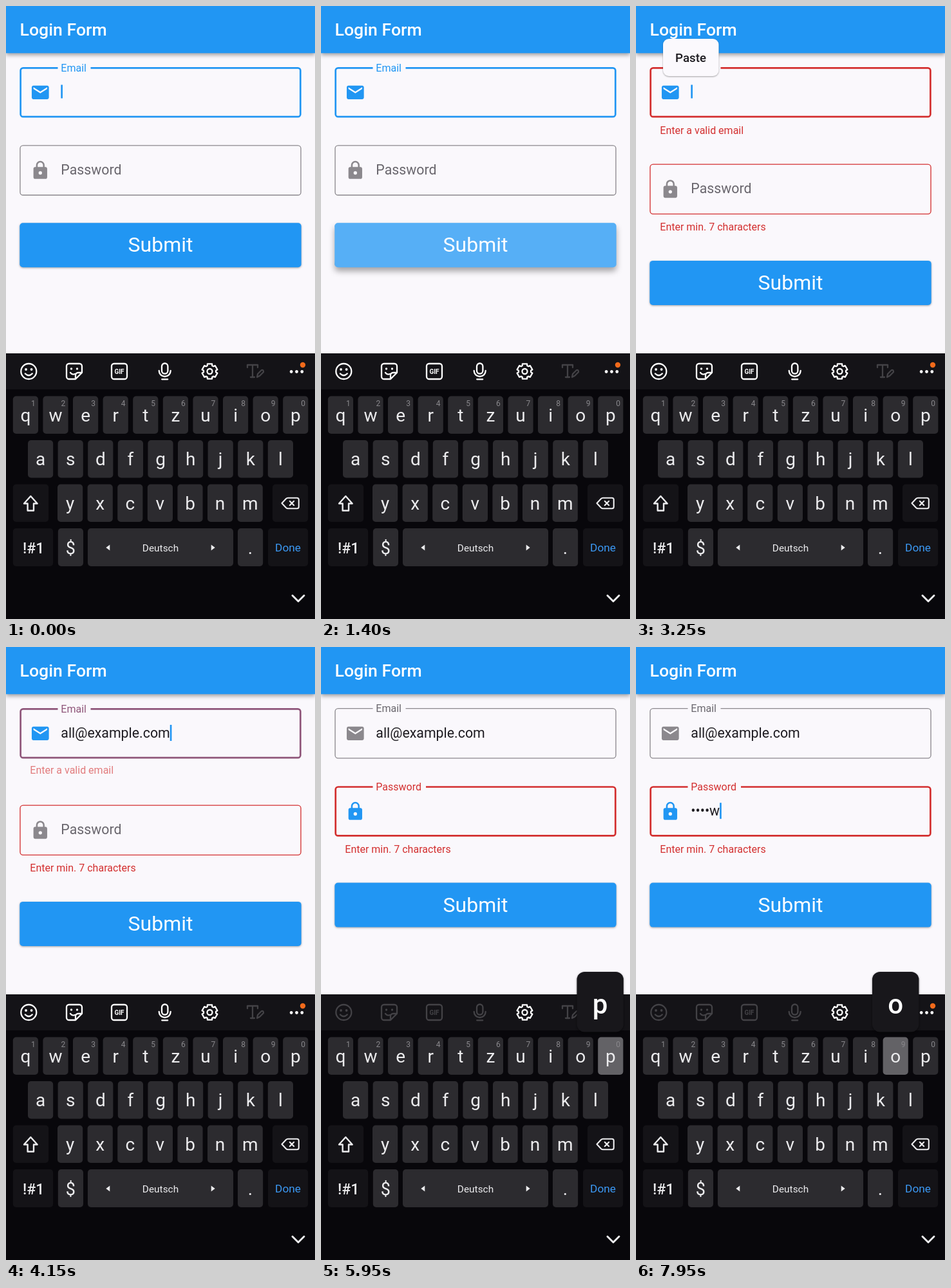
Animation, 480 px wide and 953 px high, one loop 8000 ms. Source, as an HTML page:

```html
<!DOCTYPE html>
<html lang="en">
<head>
<meta charset="utf-8">
<title>Login Form</title>
<style>
  html, body { margin: 0; width: 100%; height: 100%; overflow: hidden; background: #faf8fc; }
  svg { display: block; width: 100%; height: 100%; }
  text { font-family: Roboto, sans-serif; white-space: pre; }
  .mid { text-anchor: middle; }
  .line { fill: none; stroke-linecap: round; stroke-linejoin: round; }
</style>
</head>
<body>
<svg id="stage" viewBox="0 0 480 953"></svg>
<script>
const LOOP = 8000;
const BLUE = [33, 150, 243], RED = [211, 47, 47], GREY = [139, 136, 141], LABEL = [106, 103, 110];
const PRESS = 600, RELEASE = 1450, MENU = 3250, PASTE = 4100, FOCUS = 5110;
const FADE = 167, ERROR_HEIGHT = 29.3, FIELD_HEIGHT = 78.5, TEXT_X = 85.3;
const ADDRESS = 'all@example.com';

// key, popup shown, character entered, popup hidden
const STROKES = [
  ['p', 5950, 6100, 6200], ['a', 6650, 6750, 6850], ['s', 6950, 7000, 7100],
  ['s', 7150, 7200, 7250], ['w', 7400, 7500, 7550], ['o', 7950, 8050, 8100],
];
const CARET_HIDDEN = [[250, 750], [1250, 1750], [2250, 2750], [3750, 4100], [4600, 5100], [5600, 6100], [6650, 6750]];

const stage = document.getElementById('stage');

function add(tag, attrs = {}, parent = stage, content) {
  const node = document.createElementNS('http://www.w3.org/2000/svg', tag);
  set(node, attrs);
  if (content !== undefined) node.textContent = content;
  parent.append(node);
  return node;
}
function set(node, attrs) {
  for (const name in attrs) node.setAttribute(name, attrs[name]);
}
const box = (x, y, width, height, rx, fill, parent) => add('rect', { x, y, width, height, rx, fill }, parent);
const label = (content, x, y, size, fill, attrs = {}, parent) =>
  add('text', { x, y, 'font-size': size, fill, ...attrs }, parent, content);
const centred = (content, x, y, size, fill, attrs = {}, parent) =>
  label(content, x, y, size, fill, { class: 'mid', ...attrs }, parent);

const clamp = v => Math.max(0, Math.min(1, v));
const lerp = (a, b, p) => a + (b - a) * p;
const mix = (a, b, p) => a.map((v, i) => lerp(v, b[i], p));
const rgb = c => `rgb(${c.map(Math.round)})`;
const within = (t, from, to) => t >= from && t < to;

function bezier(x1, y1, x2, y2) {
  const at = (a, b, s) => 3 * a * s * (1 - s) ** 2 + 3 * b * s * s * (1 - s) + s ** 3;
  return x => {
    let lo = 0, hi = 1;
    for (let i = 0; i < 20; i++) {
      const s = (lo + hi) / 2;
      if (at(x1, x2, s) < x) lo = s; else hi = s;
    }
    return at(y1, y2, lo);
  };
}
const ease = bezier(0.25, 0.1, 0.25, 1);
const standard = bezier(0.4, 0, 0.2, 1);
const ramp = (t, start, duration = FADE) => standard(clamp((t - start) / duration));

// Form
const ICONS = {
  mail: 'M20 4H4c-1.1 0-2 .9-2 2v12c0 1.1.9 2 2 2h16c1.1 0 2-.9 2-2V6c0-1.1-.9-2-2-2zm0 4l-8 5-8-5V6l8 5 8-5v2z',
  lock: 'M18 8h-1V6a5 5 0 0 0-10 0v2H6c-1.1 0-2 .9-2 2v10c0 1.1.9 2 2 2h12c1.1 0 2-.9 2-2V10c0-1.1-.9-2-2-2z' +
    'm-6 9a2 2 0 1 1 0-4 2 2 0 0 1 0 4zm3.1-9H8.9V6a3.1 3.1 0 0 1 6.2 0v2z',
};

function makeField(name, icon, error, gap) {
  const group = add('g');
  return {
    group, gap,
    outline: add('path', { class: 'line', style: 'stroke-linecap:butt' }, group),
    icon: add('path', { d: ICONS[icon], transform: 'translate(37.3 23.3) scale(1.3333)', 'fill-rule': 'evenodd' }, group),
    caret: box(TEXT_X, 27.5, 2.67, 21, 0, rgb(BLUE), group),
    text: label('', TEXT_X, 45.5, 21.33, '#1d1b20', {}, group),
    name: label(name, TEXT_X, 0, 16, '', {}, group),
    error: label(error, 37.3, 0, 16, rgb(RED), {}, group),
  };
}

function outlinePath(width, gap) {
  const inset = width / 2, r = 5.3 - inset;
  const left = 21.3 + inset, right = 458.7 - inset, top = inset, bottom = FIELD_HEIGHT - inset;
  const arc = (x, y) => `A${r} ${r} 0 0 1 ${x} ${y}`;
  return `M${80.5 + gap} ${top}H${right - r}${arc(right, top + r)}V${bottom - r}${arc(right - r, bottom)}` +
    `H${left + r}${arc(left, bottom - r)}V${top + r}${arc(left + r, top)}H80.5`;
}

function drawField(field, s) {
  set(field.group, { transform: `translate(0 ${s.top})` });
  set(field.outline, { d: outlinePath(s.width, field.gap * s.float), stroke: rgb(s.border), 'stroke-width': s.width });
  set(field.icon, { fill: rgb(s.focused ? BLUE : GREY) });
  set(field.name, {
    y: lerp(45.5, s.width / 2 + 5.4, s.float),
    'font-size': lerp(21.33, 16, s.float),
    fill: rgb(s.label),
  });
  set(field.error, { y: 103.5 - 5 * (1 - s.error), opacity: s.error });
  if (field.text.textContent !== s.text) field.text.textContent = s.text;
  set(field.caret, {
    x: TEXT_X + (s.text ? field.text.getComputedTextLength() : 0),
    y: s.text ? 26 : 27.5,
    height: s.text ? 25 : 21,
    opacity: s.focused && s.caret ? 1 : 0,
  });
}

box(0, 0, 480, 953, 0, '#faf8fc');
const email = makeField('Email', 'mail', 'Enter a valid email', 51);
const password = makeField('Password', 'lock', 'Enter min. 7 characters', 82.5);

const submit = add('g');
const submitShape = box(21.3, 0, 437.4, 69, 5, rgb(BLUE), submit);
const clip = add('clipPath', { id: 'button' }, submit);
box(21.3, 0, 437.4, 69, 5, '#000', clip);
const ripple = add('circle', { fill: '#fff', cy: 34.5 }, add('g', { 'clip-path': 'url(#button)' }, submit));
centred('Submit', 240, 45, 32, '#fff', {}, submit);

box(0, -20, 480, 93.3, 0, rgb(BLUE)).style.filter = 'drop-shadow(0 3px 3px rgba(0,0,0,.36))';
label('Login Form', 21.5, 46, 26.67, '#fff', { 'font-weight': 500 });

const menu = add('g');
box(42, 51, 86.5, 58, 9, '#fbf9fd', menu).style.filter = 'drop-shadow(0 1px 1.3px rgba(0,0,0,.35))';
centred('Paste', 85, 86.5, 18.67, '#1d1b20', { 'font-weight': 500 }, menu);

// Keyboard
const KEY = '#2c2b2f', DARK = '#141317', INK = '#ececee', DIM = '#434246';
box(0, 540, 480, 413, 0, '#08070b');
box(0, 540, 480, 56, 0, DARK);

function toolIcon(x, d, color = '#fff') {
  const group = add('g', { transform: `translate(${x} 568)`, color });
  add('path', { d, class: 'line', stroke: 'currentColor', 'stroke-width': 2.3 }, group);
  return group;
}
const dots = (group, points, r) => points.forEach(([cx, cy]) => add('circle', { cx, cy, r, fill: 'currentColor' }, group));
const gearPath = 'M' + Array.from({ length: 6 }, (_, k) =>
  [[-17, 12.2], [17, 12.2], [23, 9.6], [37, 9.6]].map(([offset, r]) => {
    const a = (k * 60 + offset) * Math.PI / 180;
    return `${(r * Math.sin(a)).toFixed(2)} ${(-r * Math.cos(a)).toFixed(2)}`;
  }).join('L')).join('L') + 'ZM4 0A4 4 0 1 1-4 0A4 4 0 1 1 4 0';

const smile = toolIcon(35.3, 'M12 0A12 12 0 1 1-12 0A12 12 0 1 1 12 0M-5.5 3.5Q0 9 5.5 3.5');
dots(smile, [[-4.3, -3], [4.3, -3]], 1.9);
const sticker = toolIcon(106, 'M12 2V-8a4 4 0 0 0-4-4H-8a4 4 0 0 0-4 4V8a4 4 0 0 0 4 4H2L12 2H6a4 4 0 0 0-4 4V12M-6 2Q-3 6 1 4');
dots(sticker, [[-4.5, -4], [4.5, -4]], 1.7);
const gif = toolIcon(176, 'M-8-12H8a4 4 0 0 1 4 4V8a4 4 0 0 1-4 4H-8a4 4 0 0 1-4-4V-8a4 4 0 0 1 4-4');
centred('GIF', 0, 3.7, 10, 'currentColor', { 'font-weight': 700 }, gif);
const mic = toolIcon(246.7, 'M0-12.5a4.7 4.7 0 0 1 4.7 4.7V-1a4.7 4.7 0 0 1-9.4 0V-7.8A4.7 4.7 0 0 1 0-12.5M-9-1a9 9 0 0 0 18 0M-4.5 12.3H4.5');
toolIcon(316.5, gearPath);
toolIcon(388, 'M-13-6V-10H3V-6M-5-10V9M-8 9H-2M2 9l1-5 6-6q3-1 3 3l-6 6z', DIM);
dots(toolIcon(451.5, ''), [[-8.3, 0.5], [0, 0.5], [8.3, 0.5]], 2.4);
dots(toolIcon(461, '', '#f26a1b'), [[0, -10]], 4.2);
const textTools = [smile, sticker, gif, mic];

const keys = {};
function letterKey(char, x, y) {
  const shape = box(x, y, 39.2, 58.5, 5, KEY);
  centred(char, x + 19.6, y + 39, 28, INK);
  keys[char] = { shape, x, y };
}
[['qwertzuiop'.replace('qwertz', 'qwertz'), 10.8, 606.5], ['asdfghjkl', 34, 675], ['yxcvbnm', 80, 743.5]]
  .forEach(([row, left, y]) => [...row].forEach((char, i) => letterKey(char, left + i * 46.6, y)));
[...'1234567890'].forEach((digit, i) => centred(digit, 42.3 + i * 46.6, 622.3, 12, '#89888c'));

box(10.8, 743.5, 55.4, 58.5, 5, DARK);
box(414, 743.5, 55.2, 58.5, 5, DARK);
box(10.8, 812, 62.4, 59, 5, DARK);
box(80.8, 812, 39.2, 59, 5, KEY);
box(127, 812, 226, 59, 5, KEY);
box(360, 812, 39.2, 59, 5, KEY);
box(407, 812, 62.2, 59, 5, DARK);
const stroke = (d, width) => add('path', { d, class: 'line', stroke: INK, 'stroke-width': width });
stroke('M38.3 762l10.3 11.5h-5.6v11h-9.4v-11h-5.6z', 2.4);
stroke('M428.5 773l6.5-7q1.3-1.3 3-1.3h14q2.8 0 2.8 2.8v11q0 2.8-2.8 2.8h-14q-1.7 0-3-1.3zM440.8 769.8l6.4 6.4M447.2 769.8l-6.4 6.4', 2.1);
stroke('M445 916.5l9 9 9-9', 3);
centred('!#1', 42.7, 850.5, 23, INK, { 'font-weight': 500 });
centred('$', 100.3, 851.5, 27, INK);
centred('.', 379.5, 852, 28, INK);
centred('Deutsch', 240, 847.8, 15.4, INK);
centred('Done', 438, 848.3, 17.3, '#3b98f3');
add('path', { d: 'M155.3 842l6-4.6v9.2zM324.7 842l-6-4.6v9.2z', fill: INK });

const popup = add('g');
box(0, 0, 72.4, 93.5, 12, '#18171b', popup).style.filter = 'drop-shadow(0 1px 1.5px rgba(0,0,0,.5))';
const popupChar = centred('', 36.2, 64.5, 42, '#fff', { 'font-weight': 500 }, popup);

function drawForm(t) {
  const invalid = ramp(t, RELEASE), fixed = ramp(t, PASTE), moved = ramp(t, FOCUS);
  const caret = !CARET_HIDDEN.some(([from, to]) => within(t, from, to));
  const onPassword = t >= FOCUS;
  const typed = STROKES.filter(s => t >= s[2]).map(s => s[0]);
  const emailColor = mix(mix(BLUE, RED, invalid), BLUE, fixed);
  const emailExtra = within(t, RELEASE, PASTE + FADE) ? ERROR_HEIGHT : 0;
  const passwordTop = 216.2 + emailExtra;

  drawField(email, {
    top: 95, width: lerp(2.67, 1.33, moved), float: 1, focused: !onPassword, caret,
    border: mix(emailColor, GREY, moved), label: mix(emailColor, LABEL, moved),
    error: invalid * (1 - fixed), text: t >= PASTE ? ADDRESS : '',
  });
  drawField(password, {
    top: passwordTop, width: lerp(1.33, 2.67, moved), float: moved, focused: onPassword, caret,
    border: mix(GREY, RED, invalid), label: mix(LABEL, RED, moved),
    error: invalid, text: '•'.repeat(Math.max(0, typed.length - 1)) + (typed.at(-1) || ''),
  });
  set(submit, { transform: `translate(0 ${passwordTop + 121.1 + (t >= RELEASE ? ERROR_HEIGHT : 0)})` });
}

function drawPress(t) {
  const lift = ramp(t, PRESS, 200) - ramp(t, RELEASE, 200);
  submitShape.style.filter = `drop-shadow(0 ${lerp(1.8, 6, lift)}px ${lerp(1.4, 5, lift)}px rgba(0,0,0,.34))`;
  const spread = ease(clamp((t - PRESS) / 1000));
  const alpha = clamp((t - PRESS) / 75) * (1 - clamp((t - RELEASE - 225) / 150));
  set(ripple, { cx: lerp(395, 240, spread), r: lerp(66, 228, spread), opacity: 0.24 * alpha });
}

function drawKeyboard(t) {
  textTools.forEach(icon => set(icon, { color: t >= FOCUS ? DIM : '#fff' }));
  const active = STROKES.find(s => within(t, s[1], s[3]));
  for (const char in keys) set(keys[char].shape, { fill: active && active[0] === char ? '#636266' : KEY });
  set(popup, { visibility: active ? 'visible' : 'hidden' });
  if (!active) return;
  const { x, y } = keys[active[0]];
  set(popup, { transform: `translate(${Math.min(x - 16.6, 397.5)} ${y - 101.5})` });
  popupChar.textContent = active[0];
}

function frame() {
  const t = performance.now() % LOOP;
  drawForm(t);
  drawPress(t);
  drawKeyboard(t);
  set(menu, { visibility: within(t, MENU, PASTE) ? 'visible' : 'hidden' });
  requestAnimationFrame(frame);
}
frame();
</script>
</body>
</html>
```
